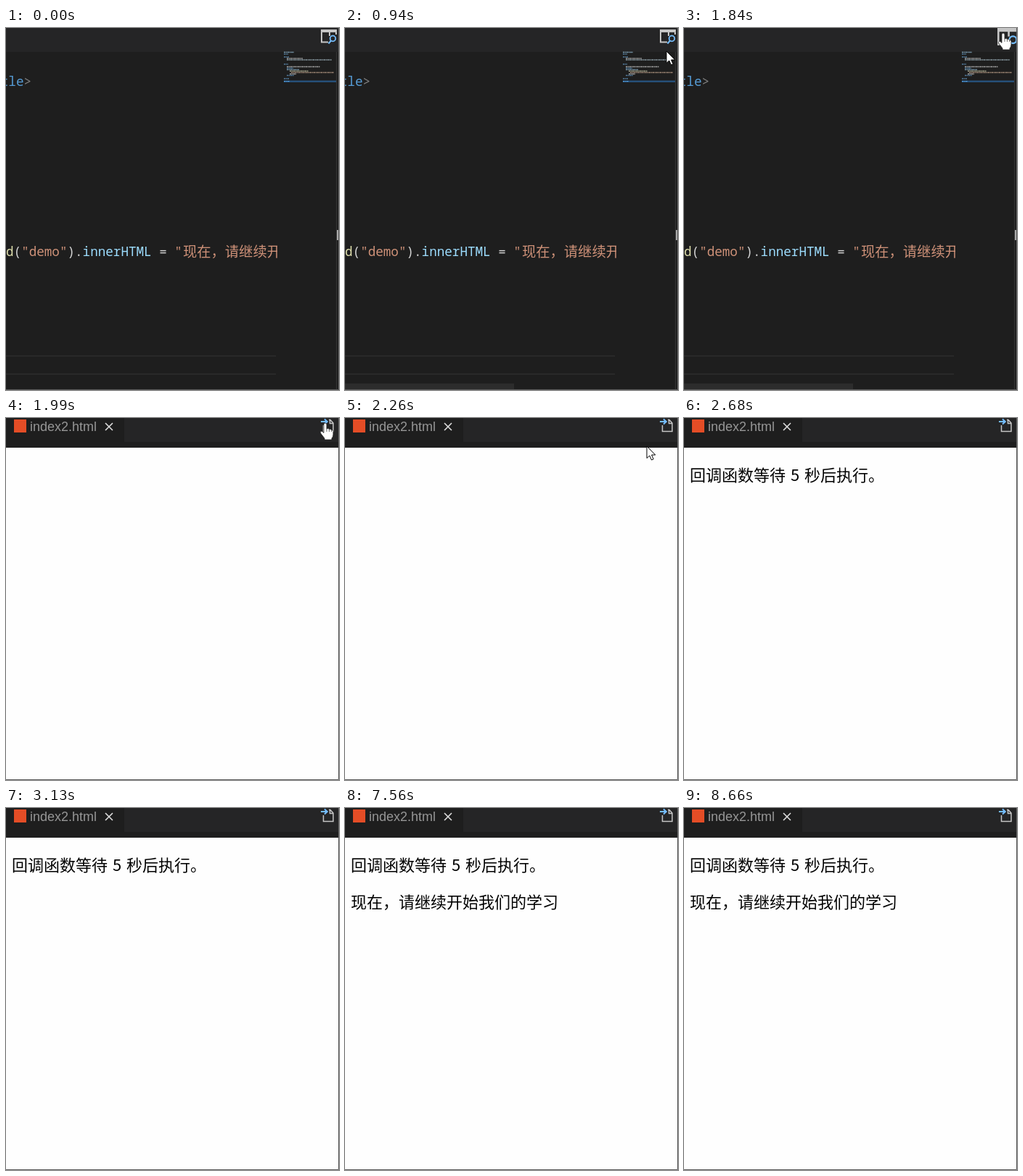
Animation, 459 px wide and 500 px high, one loop 9440 ms. Source, as an HTML page:

```html
<!DOCTYPE html>
<html lang="zh-CN">
<head>
<meta charset="utf-8">
<title>Preview</title>
<style>
  html, body { margin: 0; width: 100%; height: 100%; overflow: hidden; background: #1e1e1e; }
  svg { display: block; width: 459px; height: 500px; }
  text { white-space: pre; }
  .code { font: 17.6px "Noto Sans Mono", monospace; }
  .cjk { font-family: "Noto Sans CJK SC", "Noto Sans CJK", sans-serif; }
  .page { font-size: 22px; fill: #000; }
  .tab { font: 18px "Liberation Sans", sans-serif; fill: #969696; }
</style>
</head>
<body>
<svg viewBox="0 0 459 500">
  <defs>
    <clipPath id="codeArea"><rect width="374" height="500"/></clipPath>
    <g id="arrow">
      <path d="M0 0V16.5L3.8 13L6.5 19L9.2 17.8L6.6 12H11.8Z" fill="#fff" stroke="#000"/>
    </g>
    <g id="beam" fill="none" stroke="#ddd" stroke-width="1.4">
      <path d="M-4 -10H-1Q0 -10 0 -9V9Q0 10 -1 10H-4M4 -10H1Q0 -10 0 -9M4 10H1Q0 10 0 9"/>
    </g>
    <g id="hand">
      <path d="M-2 2Q-2 0 0 0T2 2V8Q4 6.500 5.500 8.500Q7.500 7.500 8.500 9.500Q11 9 11 11.500V16Q11 19 9 21V23H-1V21L-6 14.500Q-7.500 12 -5.500 11.300Q-4 11 -2 13.500Z" fill="#fff" stroke="#222" stroke-width=".8"/>
      <path d="M2 8V12M5.500 9V12M8.500 10V12" stroke="#444" stroke-width=".8"/>
    </g>
  </defs>

  <rect width="459" height="500" fill="#1e1e1e"/>
  <rect width="459" height="33" fill="#252526"/>

  <g id="editor">
    <g clip-path="url(#codeArea)">
      <text class="code" x="-7.2" y="80" fill="#569cd6">tle<tspan fill="#808080">&gt;</tspan></text>
      <text class="code" x="0" y="315" fill="#d4d4d4"><tspan fill="#dcdcaa">d</tspan>(<tspan fill="#ce9178">"demo"</tspan>).<tspan fill="#9cdcfe">innerHTML</tspan> = <tspan fill="#ce9178">"</tspan></text>
      <text class="cjk" x="244" y="315.500" font-size="19.300" fill="#ce9178">现在，请继续开</text>
    </g>
    <path d="M0 453H372M0 478H372" stroke="#292929" stroke-width="2"/>
    <rect id="scrollbar" y="491" width="233" height="8" fill="#2c2c2c"/>
    <rect x="383" y="72.500" width="72" height="2.500" fill="#264f78"/>
    <g id="minimap" stroke-width="1.300" stroke-dasharray="2.500 .6 1.500 .5"></g>
    <path d="M455.500 33V499" stroke="#343434"/>
    <rect x="456" y="279" width="3" height="14" fill="#aaa"/>
    <g id="splitIcon">
      <path d="M435 2V19.500H444M446 5V11M455 3V9" fill="none" stroke="#c5c5c5" stroke-width="2"/>
      <rect x="434" y="2" width="22" height="4" fill="#c5c5c5"/>
      <circle cx="450.500" cy="14.500" r="3.800" fill="none" stroke="#75beff" stroke-width="1.800"/>
      <path d="M448 17.500L444.500 21.500" stroke="#75beff" stroke-width="2"/>
    </g>
  </g>

  <g id="preview">
    <rect width="163" height="34" fill="#1e1e1e"/>
    <rect x="11" y="2" width="17" height="18" fill="#e44d26"/>
    <text class="tab" x="33" y="18">index2.html</text>
    <path d="M137 7L147 17M147 7L137 17" stroke="#ddd" stroke-width="1.600"/>
    <path d="M445 2.500H447L451 7V18.500H437.500V10M446.500 3V7.500H451" fill="none" stroke="#c5c5c5" stroke-width="1.500"/>
    <path d="M434 5H442M439 1.500L442.800 5L439 8.500" fill="none" stroke="#75beff" stroke-width="2"/>
    <rect id="paper" y="41" width="459" height="459" fill="#fefefe"/>
    <g id="spinner"></g>
    <g id="intro" class="cjk page">
      <text x="8" y="86.500">回调函数等待</text>
      <text x="147" y="86.500">5</text>
      <text x="166" y="86.500">秒后执行。</text>
    </g>
    <text id="result" class="cjk page" x="8" y="138">现在，请继续开始我们的学习</text>
  </g>

  <path d="M458.500 0V499.500H0" fill="none" stroke="#5a5a5a"/>
  <use id="cursor"/>
</svg>
<script>
const LOOP = 9440;
const $ = id => document.getElementById(id);

function add(parent, tag, attrs) {
  const el = document.createElementNS('http://www.w3.org/2000/svg', tag);
  for (const key in attrs) el.setAttribute(key, attrs[key]);
  parent.append(el);
}

// Minimap rows: left, top, width, colour
[
  [383, 33.5, 14, '#7897ab'], [383, 36, 6, '#527a9b'], [383, 40, 7, '#527a9b'],
  [387, 42, 22, '#9a9a9a'], [387, 44, 62, '#8798a0'], [383, 50, 6, '#527a9b'],
  [387, 53.5, 46, '#a3a3a3'], [387, 55.5, 9, '#527a9b'], [387, 57.5, 17, '#7897ab'],
  [391, 59.5, 26, '#a5a58a'], [393, 61.5, 59, '#a08876'], [391, 63.5, 9, '#aaa'],
  [387, 65.5, 10, '#527a9b'], [383, 70, 7, '#527a9b'], [383, 73.7, 8, '#569cd6']
].forEach(([x, y, w, stroke]) => add($('minimap'), 'path', { d: `M${x} ${y}h${w}`, stroke }));

['#3c93d3', '#559fd8', '#7db5e0', '#8fc0e5', '#a9d0ec', '#c4dff1', '#e0eff7'].forEach((fill, i) => {
  const angle = -Math.PI / 2 - i * Math.PI / 4;
  add($('spinner'), 'circle', {
    cx: 233.5 + 33 * Math.cos(angle), cy: 273.5 + 33 * Math.sin(angle), r: 8.8, fill
  });
});

// Pointer steps: start time, shape, x, y
const pointer = [
  [0, ''],
  [280, 'beam', 22, 416], [400, 'beam', 128, 228],
  [550, 'beam', 262, 148], [670, 'beam', 362, 88], [790, 'arrow', 443, 43],
  [940, 'arrow', 443, 32], [1060, 'arrow', 442, 22], [1180, 'hand', 441, 13], [1300, 'hand', 440, 9],
  [1450, 'hand', 440, 7], [1990, 'hand', 440, 7],
  [2260, 'arrow', 416, 39], [2410, 'arrow', 430, 92],
  [2560, '']
];

function show(id, visible) {
  $(id).style.display = visible ? '' : 'none';
}

function render(t) {
  const opened = t >= 1990;
  const loading = t >= 2410 && t < 2560;
  show('editor', !opened);
  show('preview', opened);
  show('scrollbar', t >= 940);
  show('paper', !loading);
  show('spinner', loading);
  show('intro', t >= 2560);
  show('result', t >= 7560);
  $('splitIcon').setAttribute('transform', t >= 1840 ? 'translate(432 0) scale(1.3) translate(-434 -2)' : '');

  const [, shape, x = 0, y = 0] = pointer.findLast(step => step[0] <= t);
  show('cursor', shape);
  $('cursor').setAttribute('href', '#' + shape);
  $('cursor').setAttribute('transform', `translate(${x} ${y})`);
}

const start = performance.now();
function tick() {
  render((performance.now() - start) % LOOP);
  requestAnimationFrame(tick);
}
tick();
</script>
</body>
</html>
```
